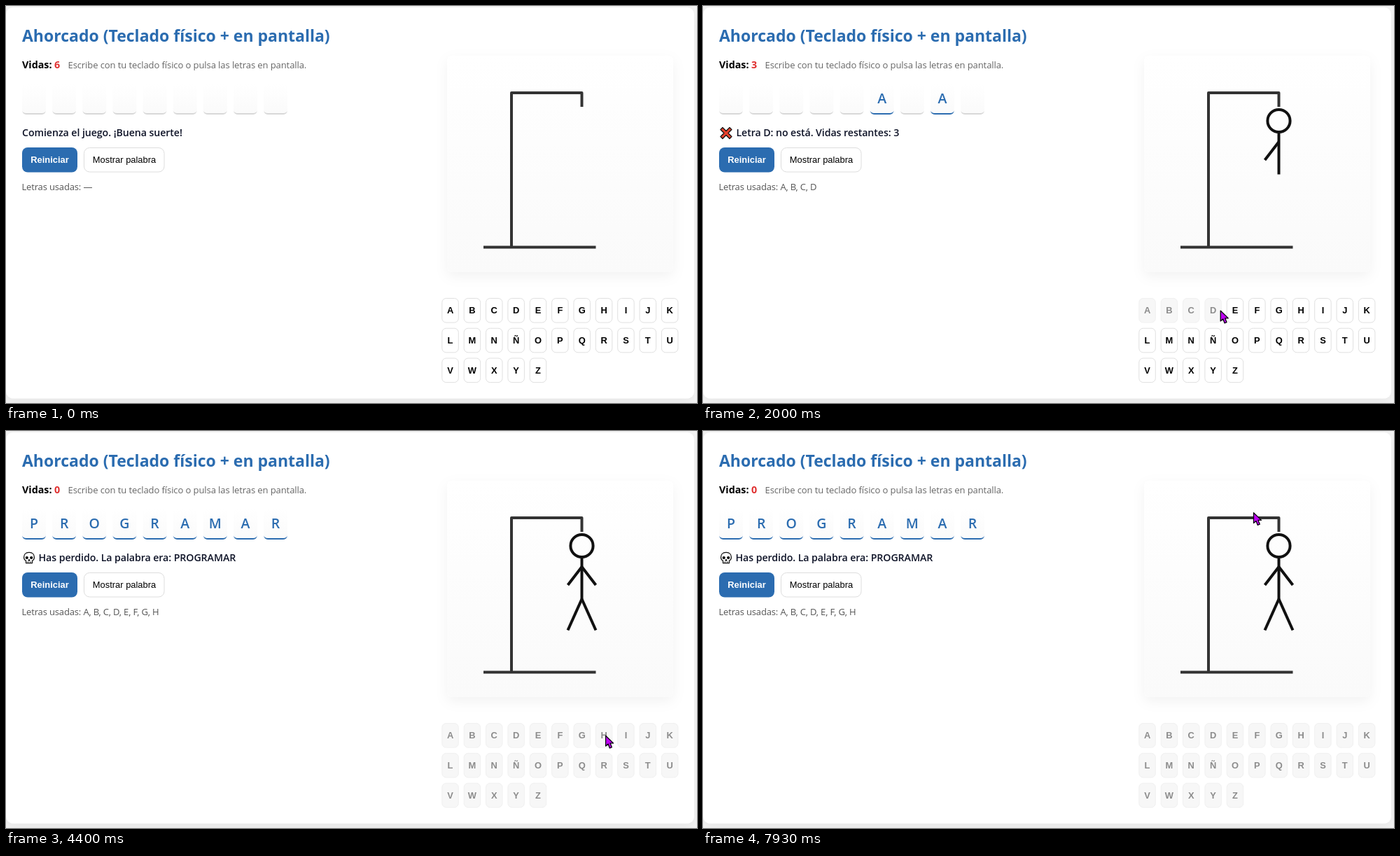
An HTML page that plays this animation: 987 px wide and 567 px high, repeating every 8 s.

```html
<!DOCTYPE html>
<html lang="es">
<head>
<meta charset="utf-8">
<title>Ahorcado</title>
<style>
  html, body { margin: 0; width: 100%; height: 100%; overflow: hidden; background: #f3f3f3; }
  svg { display: block; width: 100%; height: 100%; }
  text { font-family: "Open Sans", "Noto Sans", sans-serif; }
  .title { font-size: 23px; font-weight: 700; fill: #2b6cb0; }
  .lives { font-size: 14.3px; font-weight: 700; }
  .count { fill: #e03131; }
  .small { font-size: 13px; letter-spacing: -.085px; fill: #666; }
  .used { letter-spacing: -.15px; fill: #555; }
  .msg { font-size: 14.2px; font-weight: 600; letter-spacing: -.08px; fill: #0f1428; }
  .cell { font-size: 19.5px; font-weight: 600; fill: #2b6cb0; text-anchor: middle; }
  .btn { font: 12.9px "Liberation Sans", Arial, sans-serif; text-anchor: middle; }
  .bold { font-weight: 700; }
  .gallows { fill: none; stroke: #333; stroke-width: 4; stroke-linejoin: round; }
  .man { fill: none; stroke: #111; stroke-width: 4; }
  .pointer { fill: #bf00f5; stroke: #0a000e; stroke-width: 1.3; stroke-linejoin: round; }
</style>
</head>
<body>
<svg viewBox="0 0 987 567" preserveAspectRatio="none">
  <defs>
    <linearGradient id="soft" x1="0" y1="0" x2="0" y2="1">
      <stop offset="0" stop-color="#fff"/><stop offset="1" stop-color="#fafafa"/>
    </linearGradient>
    <filter id="shadow" x="-15%" y="-15%" width="130%" height="130%">
      <feDropShadow dx="0" dy="6" stdDeviation="9" flood-opacity=".05"/>
    </filter>
  </defs>
  <rect width="987" height="567" fill="#f3f3f3"/>
  <rect x="0" y="2" width="983" height="558.5" rx="10" fill="#fff" filter="url(#shadow)"/>
  <text class="title" x="23" y="51">Ahorcado (Teclado físico + en pantalla)</text>
  <text class="lives" x="23" y="89">Vidas:</text>
  <text class="small" x="88.5" y="88.5">Escribe con tu teclado físico o pulsa las letras en pantalla.</text>
  <rect x="23" y="202" width="79" height="35.5" rx="8" fill="#2b6cb0"/>
  <text class="btn bold" x="62.5" y="224" fill="#fff">Reiniciar</text>
  <rect x="111.5" y="202.5" width="114.5" height="34.5" rx="8" fill="#fff" stroke="#ddd"/>
  <text class="btn" x="169" y="224">Mostrar palabra</text>
  <rect x="630" y="71" width="323" height="309" rx="8" fill="url(#soft)" filter="url(#shadow)"/>
  <path class="gallows" d="M682 344.5H842.5M722 344.5V124H822.5V144"/>
  <g id="game"></g>
</svg>
<script>
const game = document.getElementById('game');

// Time runs in ticks of 1/15 s.
const TICK = 200 / 3, LOOP = 120;
const WORD = 'PROGRAMAR';
const ALPHABET = [...'ABCDEFGHIJKLMNÑOPQRSTUVWXYZ'];
const LIVES = 6;
const KEY_W = 23.5, KEY_H = 34.6;

// Tick at which each key goes down; it comes up one tick later.
const presses = { A: 14, B: 19, C: 23, D: 27, E: 32, F: 41, G: 47, H: 60 };
const END = presses.H + 1;

const icons = {
  miss: `<path d="M28 173.5l5 5 5-5 3 3-5 5 5 5-3 3-5-5-5 5-3-3 5-5-5-5z"
    fill="#e8412c" stroke="#111" stroke-width="1.2" stroke-linejoin="round"/>`,
  hit: `<rect x="25.2" y="173.2" width="15.8" height="15.8" fill="#16c60c" stroke="#111" stroke-width="1.2"/>
    <path d="M28 181.5l3.5 3.5 7-7.5" fill="none" stroke="#fff" stroke-width="1.8"/>`,
  lost: `<path d="M33 173.3c-5 0-7.4 3.2-7.4 7 0 2.4 1 4.2 3 5v3.4h8.8v-3.4c2-.8 3-2.6 3-5 0-3.8-2.4-7-7.4-7z"
    fill="#fff" stroke="#111" stroke-width="1.3"/>
    <circle cx="29.8" cy="181" r="2.1"/><circle cx="36.2" cy="181" r="2.1"/>
    <path d="M33 183l-1.2 2.2h2.4zM31.4 186.3v2.4M34.6 186.3v2.4" stroke="#111" stroke-width=".9"/>`
};

const lerp = (a, b, p) => a + (b - a) * p;
const smooth = p => p * p * (3 - 2 * p);
const clamp = p => Math.max(0, Math.min(1, p));
const grey = v => `rgb(${v},${v},${v})`;
const text = (cls, x, y, s) => `<text class="${cls}" x="${x}" y="${y}">${s}</text>`;
const stroke = d => `<path class="man" d="${d}"/>`;

const limb = (y, side, drop) => stroke(`M822.5 ${y}l${20 * side} ${drop}`);
const body = [
  '<circle class="man" cx="822.5" cy="164" r="16.1"/>',
  stroke('M822.5 181V240.5'),
  limb(194, -1, 26), limb(194, 1, 26),
  limb(240, -1, 44.5), limb(240, 1, 44.5)
];

const keys = ALPHABET.map((letter, i) => {
  const press = presses[letter] ?? END;
  return {
    letter, press,
    x: 622.8 + 31.36 * (i % 11),
    y: 417.5 + 42.75 * Math.floor(i / 11),
    off: Math.min(press + 1, END)
  };
});

// The pointer glides from key to key, then drifts off upwards.
const glide = (leave, arrive, x, y, sway = 0) => ({ leave, arrive, x, y, sway });
const moves = keys.filter(k => presses[k.letter]).map((k, i, list) => {
  const leave = i ? list[i - 1].off + 1 : 2;
  const arrive = i ? Math.min(k.press, leave + 4) : 11;
  return glide(leave, arrive, k.x + KEY_W / 2 + 2, k.y + 17);
}).concat(
  glide(84, 87, 810, 453),
  glide(89, 92, 750, 475),
  glide(94, 99, 776, 475),
  glide(101, 104, 765, 475),
  glide(106, 119, 786, 116, 62)
);

function pointerAt(n) {
  let x = 870, y = 538;
  for (const m of moves) {
    const p = smooth(clamp((n - m.leave) / (m.arrive - m.leave)));
    x = lerp(x, m.x, p) + m.sway * Math.sin(Math.PI * p);
    y = lerp(y, m.y, p);
  }
  return [x, y];
}

function drawPointer(n) {
  if (n <= moves[0].leave) return '';
  const [x, y] = pointerAt(n);
  const hand = keys.some(k => n < k.off && x >= k.x && x <= k.x + KEY_W && y >= k.y && y <= k.y + KEY_H);
  const shape = hand
    ? 'M-2 2a2 2 0 0 1 4 0v5h2l2 1h2l1.2 2v5l-1.5 3v2.6h-8l-1-2.6-4-5v-2l2-1 1.3 1z'
    : 'M.5.7V15.5L4 12.4 6.3 18.4 9.3 17.2 7 11.4H11.5Z';
  return `<path class="pointer" transform="translate(${x} ${y})" d="${shape}"/>`;
}

function drawKey(k, n) {
  const off = n >= k.off;
  const fade = clamp((n - k.off + 1) / 3);
  const y = k.y + (n >= k.press && !off ? 1 : 0);
  return `<rect x="${k.x}" y="${y}" width="${KEY_W}" height="${KEY_H}" rx="6"
      fill="${grey(lerp(255, 247, fade))}" stroke="${grey(off ? 240 : 224)}"/>
    <text class="btn bold" x="${k.x + KEY_W / 2}" y="${y + 21.5}" fill="${grey(off ? 140 : 0)}">${k.letter}</text>`;
}

function drawCell(letter, i, shown) {
  const x = 23 + 43.13 * i;
  return `<rect x="${x}" y="111" width="34" height="44" rx="6" fill="url(#soft)"/>
    <path d="M${x} 149a6 6 0 0 0 6 6h22a6 6 0 0 0 6-6a6 4 0 0 1-6 4h-22a6 4 0 0 1-6-4z"
      fill="${shown ? '#2b6cb0' : '#d8d8d8'}"/>` +
    (shown ? text('cell', x + 17, 139, letter) : '');
}

function drawMessage(used, lives) {
  const last = used[used.length - 1];
  if (!last) return text('msg', 23, 186, 'Comienza el juego. ¡Buena suerte!');
  if (!lives) return icons.lost + text('msg', 46.5, 186, `Has perdido. La palabra era: ${WORD}`);
  return WORD.includes(last)
    ? icons.hit + text('msg', 47.5, 186, `Letra ${last}: acierto`)
    : icons.miss + text('msg', 47.5, 186, `Letra ${last}: no está. Vidas restantes: ${lives}`);
}

function draw(n) {
  const used = Object.keys(presses).filter(c => n > presses[c]);
  const misses = used.filter(c => !WORD.includes(c)).length;
  const lives = LIVES - misses;
  game.innerHTML =
    text('lives count', 69, 89, lives) +
    [...WORD].map((c, i) => drawCell(c, i, !lives || used.includes(c))).join('') +
    drawMessage(used, lives) +
    text('small used', 22.5, 263, `Letras usadas: ${used.join(', ') || '—'}`) +
    body.slice(0, misses).join('') +
    keys.map(k => drawKey(k, n)).join('') +
    drawPointer(n);
}

const start = performance.now();
let shown = -1;

function loop() {
  const n = Math.floor((performance.now() - start + 4) / TICK) % LOOP;
  if (n !== shown) draw(shown = n);
  requestAnimationFrame(loop);
}
loop();
</script>
</body>
</html>
```
